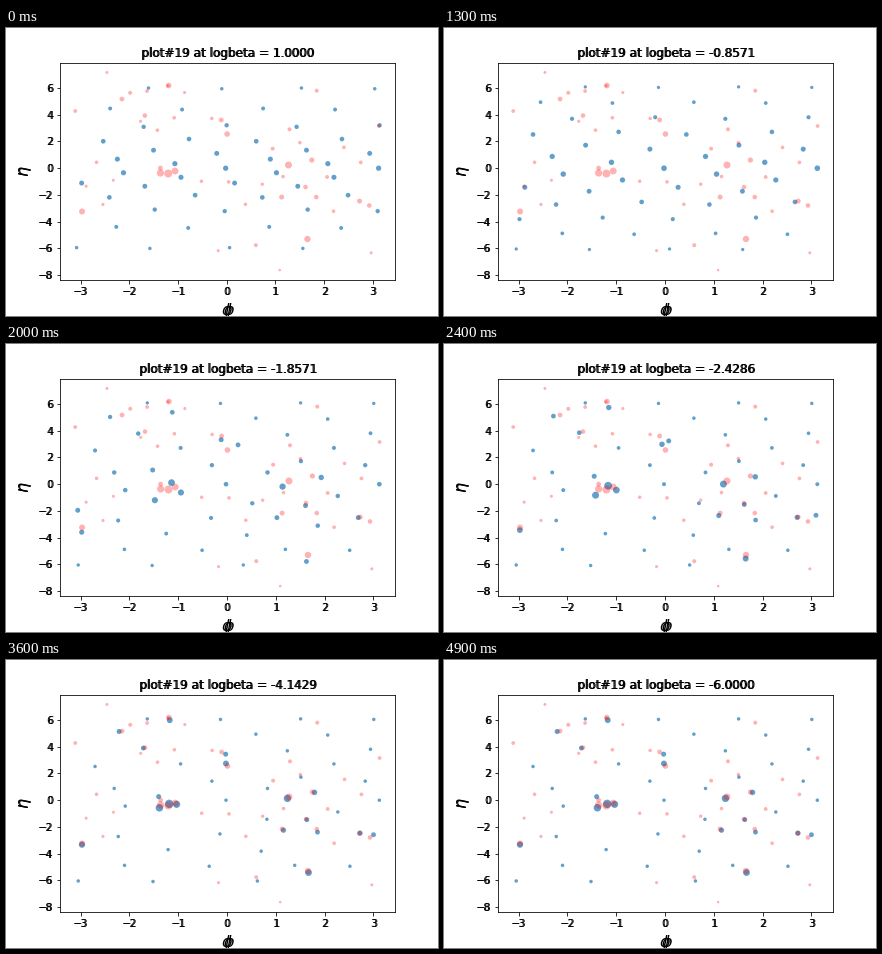
Animation, 432 px wide and 288 px high, one loop 5 s. Source, as a matplotlib script:

```python
import numpy as np
import matplotlib.pyplot as plt
from matplotlib.animation import FuncAnimation

FRAMES = 50
LOOSE = 13        # frame at which the lattice has sheared fully
SETTLE = 9        # frames over which particles gather on the jets
ASPECT = 3.65     # screen length of one phi unit in eta units

# Key particles of the event: (phi, eta, radius)
JETS = [
    (-1.20, -.40, 4), (-1.36, -.36, 3.6), (1.27, .24, 3.5), (-1.06, -.21, 3.4),
    (1.66, -5.30, 3.2), (-2.97, -3.24, 3), (-1.19, 6.19, 2.8), (.01, 2.56, 2.8),
    (1.75, .61, 2.6), (1.13, -2.16, 2.5), (2.73, -2.46, 2.5), (-1.36, .01, 2.4),
    (-2.15, 5.18, 2.4), (-.11, 3.61, 2.4), (-1.68, 3.94, 2.3),
    (1.62, -1.41, 2.3), (1.84, -2.16, 2.3), (2.93, -2.79, 2.3)]
OUTLIERS = [(-3.11, 4.28, 1.9), (-2.46, 7.17, 1.5),
            (1.09, -7.63, 1.3), (3.127, 3.16, 1.9)]
SOFT_COUNT = 28


def wrap(angle):
    return (angle + np.pi) % (2 * np.pi) - np.pi


def soft_particles(rng):
    """Faint particles, spread evenly in phi and at random in eta."""
    golden = (5 ** .5 - 1) / 2
    phi = 3.1 * (2 * (golden * np.arange(1, SOFT_COUNT + 1) % 1) - 1)
    return np.column_stack([phi, rng.uniform(-7, 6.8, SOFT_COUNT),
                            rng.uniform(1.5, 2.1, SOFT_COUNT)])


def lattice():
    """Staggered rows, wider apart away from eta = 0, mirrored at the centre."""
    upper = []
    for row in range(1, 7):
        eta = 3.43 * 1.21 ** (row - 1) - 2.92
        offset = .23 if row % 2 else -.015
        for col in range(4):
            wobble = (-1) ** (col + row // 2) * .7 ** (row - 1)
            upper.append((np.pi * (offset + col / 2 + .062 * wobble),
                          eta + .17 * wobble))
    upper = np.array(upper)
    points = np.vstack([upper, -upper, [(0, 0), (np.pi, 0)]])
    points[:, 0] = wrap(points[:, 0] - .02)
    return points


def gather(points):
    """Each jet, largest first, pulls in the nearest free particle."""
    goal = points.copy()
    drift = .55 * np.exp(-((points[:, 0] - .3) / 1.1) ** 2)
    goal[:, 0] += np.where(points[:, 1] < -1, drift, 0)
    radius = np.full(len(points), 1.75)
    free = np.ones(len(points), bool)
    for phi, eta, size in JETS:
        gap = np.column_stack([wrap(phi - goal[:, 0]), eta - goal[:, 1]])
        distance = np.hypot(ASPECT * gap[:, 0], gap[:, 1])
        nearest = np.argmin(np.where(free, distance, np.inf))
        goal[nearest] += .85 * gap[nearest]
        radius[nearest] = 1.05 * size
        free[nearest] = False
    return goal, radius


event = np.vstack([JETS, OUTLIERS, soft_particles(np.random.default_rng(19))])
start = lattice()
swing = np.sin(start[:, 1] / 2)
shear = np.column_stack([-.2 * swing, .6 * swing])
goal, goal_radius = gather(start + shear)


def state(frame):
    loose = min(frame / LOOSE, 1)
    pull = 1 - np.exp(-(max(frame - LOOSE, 0) / SETTLE) ** 2)
    points = start + loose ** 2.5 * shear
    step = goal - points
    step[:, 0] = wrap(step[:, 0])
    radius = 2.65 + .15 * loose - (.15 + .04 * loose) * np.abs(points[:, 1])
    radius += pull * (goal_radius - radius)
    points = points + pull * step
    points[:, 0] = wrap(points[:, 0])
    return points, radius


def limits(values):
    low, high = values.min(), values.max()
    margin = .05 * (high - low)
    return low - margin, high + margin


fig = plt.figure(figsize=(6, 4), dpi=72, facecolor="white")
ax = fig.add_axes([.125, .125, .775, .755])
# The lettering is drawn again one pixel to the right, which makes it heavier.
overlay = fig.add_axes([.125 + 1 / 432, .125, .775, .755], frameon=False)
overlay.tick_params(color="none")
both = (ax, overlay)

for a, label_x in zip(both, (.498, .502)):
    a.set_ylim(*limits(event[:, 1]))
    a.set_xlabel(r"$\phi$", fontsize=16, x=label_x)
    a.set_ylabel(r"$\eta$", fontsize=16, labelpad=5.5)

particles = ax.scatter([], [], color="tab:blue", alpha=.7, linewidths=0, zorder=2)
ax.scatter(event[:, 0], event[:, 1], s=(2 * event[:, 2]) ** 2,
           color="red", alpha=.3, linewidths=0, zorder=3)


def update(frame):
    points, radius = state(frame)
    particles.set_offsets(points)
    particles.set_sizes((2 * radius) ** 2)
    x_limits = limits(np.concatenate([points[:, 0], event[:, 0]]))
    for a in both:
        a.set_xlim(*x_limits)
        a.set_title(f"plot#19 at logbeta = {1 - frame / 7:.4f}", fontsize=12)
    return ()


anim = FuncAnimation(fig, update, frames=FRAMES, interval=100,
                     repeat=True, repeat_delay=0, blit=False)
plt.show()
```
